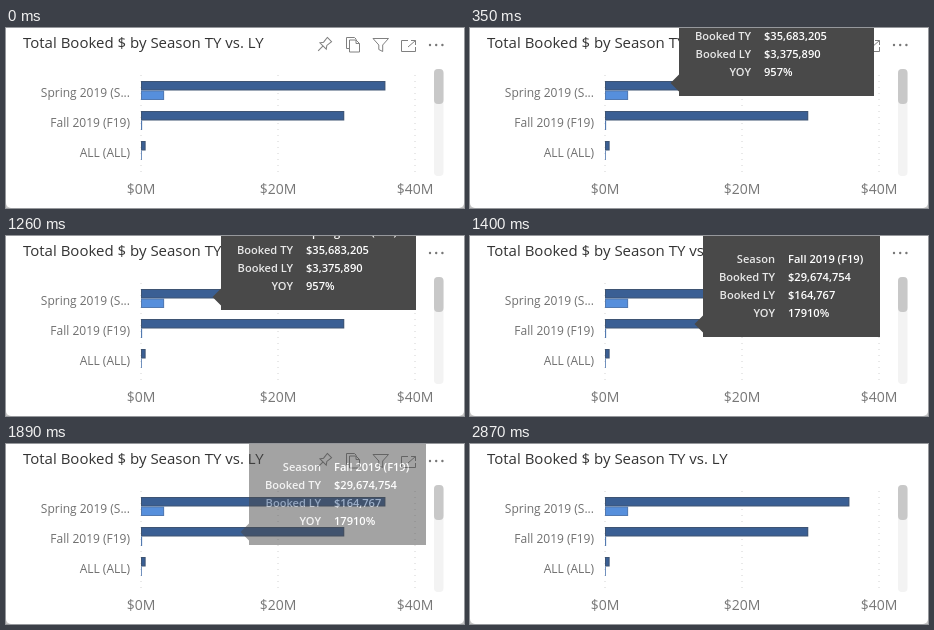
An HTML page with a canvas for the animation above (3570 ms loop, 458 px wide and 180 px high).

```html
<!DOCTYPE html>
<html lang="en">
<head>
<meta charset="utf-8">
<title>Total Booked by Season</title>
<style>
html, body { margin: 0; width: 100%; height: 100%; overflow: hidden; background: #fff; }
canvas { display: block; width: 458px; height: 180px; }
</style>
</head>
<body>
<canvas id="stage"></canvas>
<script>
const W = 458, H = 180, LOOP = 3570;
const FONT = '"Open Sans", "Noto Sans", sans-serif';
const dpr = window.devicePixelRatio || 1;

function makeContext(canvas) {
  canvas.width = W * dpr;
  canvas.height = H * dpr;
  const context = canvas.getContext('2d');
  context.scale(dpr, dpr);
  return context;
}
const ctx = makeContext(document.getElementById('stage'));
const overlay = makeContext(document.createElement('canvas'));

const AXIS_X = 135, PX_PER_MILLION = 6.85, BAR_HEIGHT = 9.5;
const seasons = [
  { label: 'Spring 2019 (S...', ty: 35.683, ly: 3.376 },
  { label: 'Fall 2019 (F19)', ty: 29.675, ly: 0.165 },
  { label: 'ALL (ALL)', ty: 0.68, ly: 0.12 }
];

const spring = {
  width: 195,
  rows: [['Season', 'Spring 2019 (S19)'], ['Booked TY', '$35,683,205'],
         ['Booked LY', '$3,375,890'], ['YOY', '957%']]
};
const fall = {
  width: 177,
  rows: [['Season', 'Fall 2019 (F19)'], ['Booked TY', '$29,674,754'],
         ['Booked LY', '$164,767'], ['YOY', '17910%']]
};

// Tooltip placement over time: left edge, bottom edge, opacity.
const tooltipKeys = [
  { at: 70, tip: spring, left: 243, bottom: 70, alpha: 1 },
  { at: 280, tip: spring, left: 209, bottom: 68, alpha: 1 },
  { at: 1260, tip: spring, left: 215, bottom: 74, alpha: 1 },
  { at: 1400, tip: fall, left: 233, bottom: 101, alpha: 1 },
  { at: 1820, tip: fall, left: 243, bottom: 101, alpha: 0.76 },
  { at: 1890, tip: fall, left: 243, bottom: 101, alpha: 0.5 },
  { at: 1960, tip: fall, left: 243, bottom: 101, alpha: 0.22 },
  { at: 2030, tip: null }
];
const ICONS_HIDE = 2870;

function text(c, str, x, y, font, color, align = 'left') {
  c.font = `${font} ${FONT}`;
  c.fillStyle = color;
  c.textAlign = align;
  c.fillText(str, x, y);
}

function rect(x, y, w, h, color) {
  ctx.fillStyle = color;
  ctx.fillRect(x, y, w, h);
}

function pill(x, y, w, h, color) {
  ctx.fillStyle = color;
  ctx.beginPath();
  ctx.roundRect(x, y, w, h, 4);
  ctx.fill();
}

function line(points, closed = false) {
  ctx.beginPath();
  points.forEach(([x, y]) => ctx.lineTo(x, y));
  if (closed) ctx.closePath();
  ctx.stroke();
}

function bar(y, millions, fill, edge) {
  const w = millions * PX_PER_MILLION;
  rect(AXIS_X, y, w, BAR_HEIGHT, edge);
  if (w > 2) rect(AXIS_X + 1, y + 1, w - 2, BAR_HEIGHT - 2, fill);
}

function drawCard() {
  rect(0, 0, W, H, '#c4c4c4');
  ctx.fillStyle = '#fff';
  ctx.beginPath();
  ctx.roundRect(0, 0, W, H, [0, 0, 5, 5]);
  ctx.fill();
  text(ctx, 'Total Booked $ by Season TY vs. LY', 17, 20, '15px', '#333');
}

function drawChart() {
  ctx.strokeStyle = '#d2d2d2';
  ctx.lineWidth = 1;
  ctx.setLineDash([1, 5]);
  [0, 20, 40].forEach(value => {
    const x = AXIS_X + value * PX_PER_MILLION;
    line([[x, 47], [x, 149]]);
    text(ctx, `$${value}M`, x, 166, '14px', '#777', 'center');
  });
  ctx.setLineDash([]);

  seasons.forEach(({ label, ty, ly }, i) => {
    const y = 53 + 30 * i;
    text(ctx, label, 124, y + 16, '12px', '#707070', 'right');
    bar(y, ty, '#3a5f94', '#3e5473');
    bar(y + BAR_HEIGHT, ly, '#568fdc', '#5279b0');
  });

  pill(428, 41, 9.5, 107, '#f3f3f3');
  pill(428, 41, 9.5, 35, '#c8c8c8');
}

function drawPin() {
  ctx.save();
  ctx.translate(318.5, 16.5);
  ctx.rotate(Math.PI / 4);
  line([[-3, -7], [3, -7], [2.3, -1], [4.5, 2], [-4.5, 2], [-2.3, -1]], true);
  line([[0, 2], [0, 9]]);
  ctx.restore();
}

function drawIcons() {
  ctx.strokeStyle = '#808080';
  ctx.lineWidth = 1;
  drawPin();

  // Copy
  line([[343, 20.5], [340.5, 20.5], [340.5, 9.5], [348.5, 9.5], [350.5, 11.5]]);
  line([[343.5, 12], [350, 12], [353.5, 15.5], [353.5, 24], [343.5, 24]], true);
  line([[350, 12], [350, 15.5], [353.5, 15.5]]);

  // Filter
  line([[367, 10.5], [382.5, 10.5], [376.7, 17], [376.7, 23.5], [372.8, 21.5], [372.8, 17]], true);

  // Focus mode
  line([[402, 12.5], [395.5, 12.5], [395.5, 23.5], [409.5, 23.5], [409.5, 19]]);
  line([[402, 19], [409.5, 12.5]]);
  line([[405, 12.5], [409.5, 12.5], [409.5, 17]]);

  // More options
  ctx.fillStyle = '#777';
  [424, 430.2, 436.4].forEach(x => {
    ctx.beginPath();
    ctx.arc(x, 17, 1.2, 0, 2 * Math.PI);
    ctx.fill();
  });
}

// Drawn on its own layer so that panel and text fade as one.
function drawTooltip({ tip, left, bottom, alpha }) {
  const right = left + tip.width, arrow = bottom - 13;
  overlay.clearRect(0, 0, W, H);
  overlay.fillStyle = '#494949';
  overlay.beginPath();
  [[left, -1], [right, -1], [right, bottom], [left, bottom],
   [left, arrow + 8.5], [left - 8.5, arrow], [left, arrow - 8.5]]
    .forEach(([x, y]) => overlay.lineTo(x, y));
  overlay.fill();
  tip.rows.forEach(([name, value], i) => {
    const y = bottom - 20 - 18 * (3 - i);
    text(overlay, name, left + 72, y, '600 11.1px', '#e8e8e8', 'right');
    text(overlay, value, left + 85, y, '600 11.1px', '#fff');
  });
  ctx.globalAlpha = alpha;
  ctx.drawImage(overlay.canvas, 0, 0, W, H);
  ctx.globalAlpha = 1;
}

function render(t) {
  drawCard();
  drawChart();
  if (t < ICONS_HIDE) drawIcons();
  const key = tooltipKeys.filter(k => k.at <= t).pop();
  if (key && key.tip) drawTooltip(key);
}

let start;
function tick(now) {
  start ??= now;
  render((now - start) % LOOP);
  requestAnimationFrame(tick);
}
render(0);
requestAnimationFrame(tick);
</script>
</body>
</html>
```
